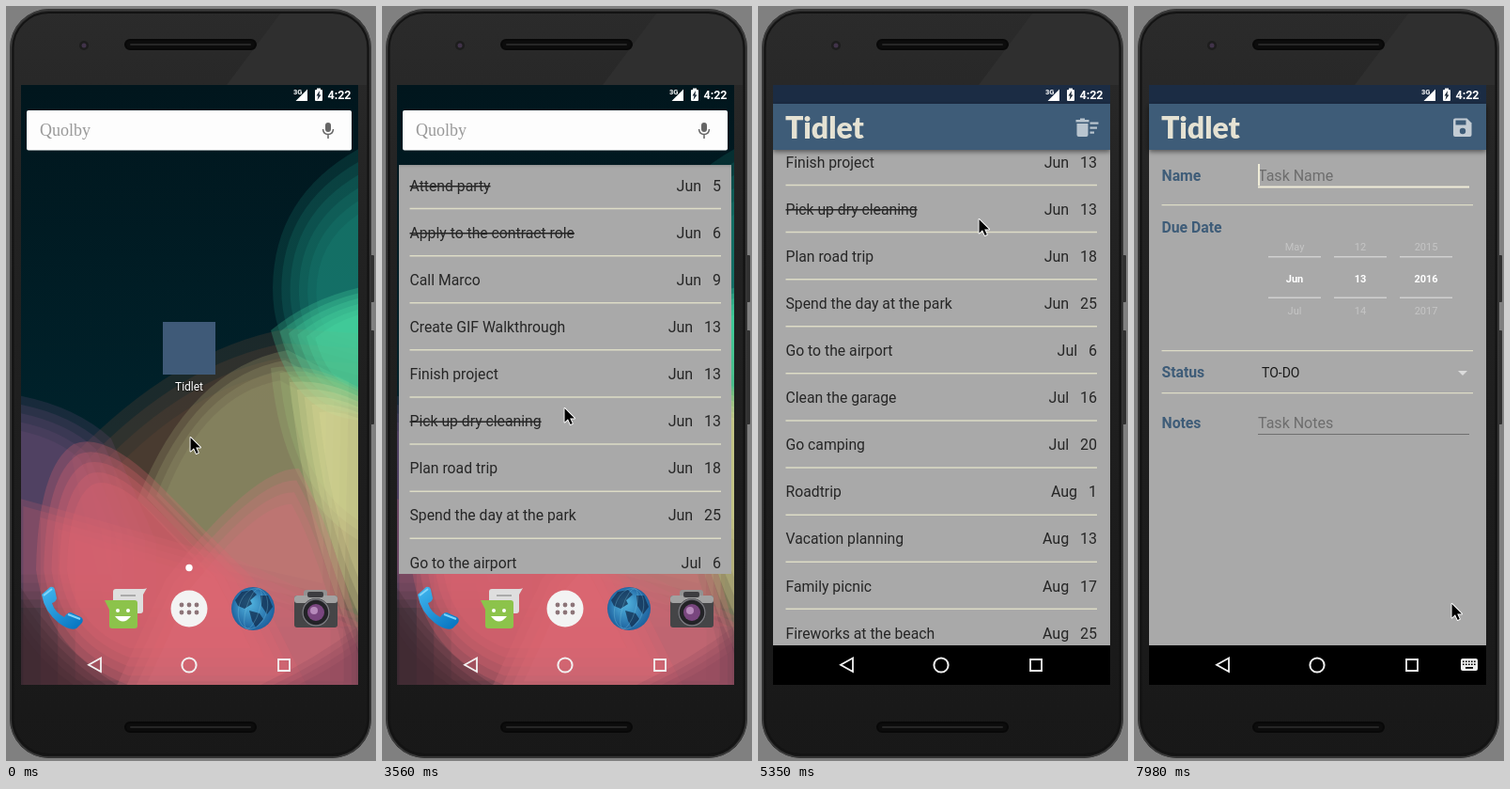
These frames come from a looping animation (394x803 px, 8000 ms). An HTML page with a canvas:

```html
<!DOCTYPE html>
<html lang="en">
<head>
<meta charset="utf-8">
<title>To-do app walkthrough</title>
<style>
  html, body { margin: 0; width: 100%; height: 100%; overflow: hidden; background: #808080; }
  canvas { display: block; }
</style>
</head>
<body>
<canvas id="stage" width="394" height="803"></canvas>
<script>
const ctx = document.getElementById('stage').getContext('2d');
const LOOP = 8000, ROW = 50.1, CREAM = '#dddcc6', BLUE = '#3e5c78', INK = '#262626';
const APP = 'Tidlet';

const TASKS = `-Attend party|Jun   5
-Apply to the contract role|Jun   6
Call Marco|Jun   9
Create GIF Walkthrough|Jun   13
Finish project|Jun   13
-Pick up dry cleaning|Jun   13
Plan road trip|Jun   18
Spend the day at the park|Jun   25
Go to the airport|Jul   6
Clean the garage|Jul   16
Go camping|Jul   20
Roadtrip|Aug   1
Vacation planning|Aug   13
Family picnic|Aug   17
Fireworks at the beach|Aug   25`.split('\n').map(line => {
  const [name, date] = line.replace('-', '').split('|');
  return { name, date, done: line[0] === '-' };
});

const TICKS = [0, 500, 660, 820, 980, 1140, 1300, 1450, 1590, 2270, 2550, 2830,
  3140, 3280, 3420, 3560, 3720, 3860, 4000, 4130, 4250, 4710, 4830, 4960, 5090, 5220,
  5350, 5500, 5630, 5910, 6050, 6190, 6320, 6450, 6580, 6710, 6850,
  7000, 7150, 7300, 7450, 7850, 7980];

// Tracks are flat lists of time, value pairs.
const cursorX = [400, 196, 1450, 188, 3000, 188, 3560, 194, 4130, 219, 4600, 220, 4830, 226,
  5350, 235, 5630, 237, 5800, 238, 6320, 244, 6850, 258, 7450, 338];
const cursorY = [400, 458, 1450, 370, 3000, 370, 3560, 427, 4130, 476, 4600, 476, 4830, 404,
  5350, 226, 5630, 180, 5800, 182, 6320, 354, 6850, 497, 7450, 635];
const scrollY = [4680, 0, 4830, 25.5, 5350, 213, 5500, 225, 5790, 225, 6320, 66, 6580, 0];
const fabSize = [4740, 1, 4830, .85, 4950, 0, 5900, 0, 6150, 1];
const clipTop = [3300, 336, 3560, 169, 3720, 98, 3860, 84];
const clipBottom = [3300, 392, 3560, 604, 3720, 700, 3860, 722];
const clipHalf = [3300, 28, 3420, 140, 3560, 177, 3720, 180];
const slide = [3300, 30, 3560, 12.5, 3860, 0];

function track(t, keys) {
  if (t <= keys[0]) return keys[1];
  for (let i = 2; i < keys.length; i += 2)
    if (t < keys[i]) {
      const k = (t - keys[i - 2]) / (keys[i] - keys[i - 2]);
      return keys[i - 1] + k * (keys[i + 1] - keys[i - 1]);
    }
  return keys[keys.length - 1];
}

function rect(x, y, w, h, color, r = 0) {
  ctx.fillStyle = color;
  ctx.beginPath();
  ctx.roundRect(x, y, w, h, r);
  ctx.fill();
}
function frame(x, y, w, h, color, r = 0, width = 1) {
  ctx.strokeStyle = color;
  ctx.lineWidth = width;
  ctx.beginPath();
  ctx.roundRect(x, y, w, h, r);
  ctx.stroke();
}
function disc(x, y, r, color) {
  ctx.fillStyle = color;
  ctx.beginPath();
  ctx.arc(x, y, r, 0, 7);
  ctx.fill();
}
function ring(x, y, r, color, width) {
  ctx.strokeStyle = color;
  ctx.lineWidth = width;
  ctx.beginPath();
  ctx.arc(x, y, r, 0, 7);
  ctx.stroke();
}
function shape(d, color, x = 0, y = 0, stroke = 0) {
  ctx.save();
  ctx.translate(x, y);
  const path = new Path2D(d);
  if (stroke) {
    ctx.lineWidth = stroke;
    ctx.strokeStyle = color;
    ctx.stroke(path);
  } else {
    ctx.fillStyle = color;
    ctx.fill(path);
  }
  ctx.restore();
}
function text(s, x, y, font, color, align = 'left') {
  ctx.font = font;
  ctx.fillStyle = color;
  ctx.textAlign = align;
  ctx.fillText(s, x, y);
}
const roboto = (size, weight = 400) => `${weight} ${size}px Roboto, sans-serif`;
function clipped(x, y, w, h, draw) {
  ctx.save();
  ctx.beginPath();
  ctx.rect(x, y, w, h);
  ctx.clip();
  draw();
  ctx.restore();
}

// Translucent copies shrinking towards a focus give the banded glow of the wallpaper.
function glow(d, x, y, rgb, bands, alpha) {
  const path = new Path2D(d);
  ctx.fillStyle = `rgba(${rgb},${alpha})`;
  for (let i = 0; i < bands; i++) {
    ctx.save();
    ctx.translate(x, y);
    ctx.scale(1 - i * .08, 1 - i * .08);
    ctx.translate(-x, -y);
    ctx.fill(path);
    ctx.restore();
  }
}

function body() {
  rect(0, 0, 394, 803, '#808080');
  rect(388, 265, 4, 50, '#303030', 1);
  rect(388, 345, 4, 100, '#303030', 1);
  const g = ctx.createLinearGradient(0, 0, 0, 803);
  g.addColorStop(0, '#2b2b2b');
  g.addColorStop(.3, '#222');
  g.addColorStop(1, '#181818');
  rect(4, 3, 385, 797, g, 42);
  shape('M292 8 H345 Q384 10 384 46 V84 H235 Z', '#2f2f2f');
  frame(5, 4, 383, 795, '#3c3c3c', 41, 1.5);
  frame(7.5, 7, 378, 789, '#131313', 38, 2);
  for (const y of [36, 762]) {
    rect(127, y, 139, 10, '#0c0c0c', 5);
    frame(127, y, 139, 10, '#080808', 5, 2);
    rect(132, y + 4, 129, 2, '#262626', 1);
  }
  disc(83, 42, 5, '#1d1d1d');
  disc(83, 42, 2.5, '#41334a');
}

function wallpaper() {
  const g = ctx.createLinearGradient(0, 84, 0, 450);
  g.addColorStop(0, '#01161d');
  g.addColorStop(1, '#00222b');
  rect(16, 84, 359, 638, g);
  glow('M400 140 Q285 190 284 300 Q284 350 310 375 L400 400 Z', 400, 310, '28,146,126', 6, .19);
  glow('M70 480 Q180 365 300 343 L400 350 V660 H110 Z', 255, 540, '104,70,52', 4, .26);
  glow('M140 525 Q195 385 300 366 L365 400 L360 650 L230 620 Z', 265, 500, '150,150,108', 4, .3);
  glow('M282 345 Q330 305 400 295 V440 Q310 450 282 345 Z', 400, 365, '76,222,162', 6, .24);
  glow('M282 385 Q330 375 400 420 V580 Q295 540 282 385 Z', 400, 450, '160,200,124', 3, .2);
  glow('M302 400 Q350 395 400 430 V730 Q325 610 302 400 Z', 400, 500, '228,224,156', 5, .22);
  glow('M0 412 Q70 422 112 460 L160 570 V640 H0 Z', 10, 530, '122,80,126', 5, .2);
  glow('M0 520 Q110 550 250 590 L400 660 V740 H0 Z', 230, 670, '196,90,106', 5, .22);
  glow('M170 610 Q265 490 312 492 Q350 560 385 700 V740 H110 Z', 280, 650, '212,112,124', 4, .26);
  glow('M32 600 Q34 490 72 466 Q105 452 162 508 L264 610 L320 722 H130 Q45 690 32 600 Z', 135, 600, '222,100,112', 5, .27);
  glow('M0 590 Q50 690 150 740 H0 Z', 0, 740, '62,40,46', 5, .26);
  glow('M230 740 Q330 700 400 640 V740 Z', 400, 740, '120,62,84', 4, .18);
}

function dock() {
  disc(195, 597.5, 3.7, '#fff');

  const blue = ctx.createLinearGradient(40, 618, 75, 662);
  blue.addColorStop(0, '#42b7ef');
  blue.addColorStop(1, '#0876c2');
  shape('M38 626 L47 618 Q51 617 52 621 L54 630 Q53 634 49 635 Q52 645 62 650 Q65 645 69 645 L80 650 Q83 652 81 656 L75 662 Q68 665 56 656 Q41 644 38 626 Z', blue);
  shape('M40 627 L49 620 M66 647 L79 652', '#7fd4fa', 0, 0, 2);

  shape('M117 620 H146 Q149 620 150 619 L146 626 V643 Q146 646 143 646 H117 Q114 646 114 643 V623 Q114 620 117 620 Z', '#dedede');
  shape('M122 627 H138', '#aaa', 0, 0, 2);
  shape('M105 632 H137 Q140 632 140 635 V659 Q140 662 137 662 H113 Q110 662 110 659 V642 Z', '#8cc34b');
  disc(119, 643, 2, '#fff');
  disc(130, 643, 2, '#fff');
  shape('M116 649 Q124.500 660 133 649 Z', '#fff');

  disc(195, 641, 19.5, '#f3f3f3');
  for (let i = 0; i < 6; i++)
    disc(187 + i % 3 * 8, 637 + (i > 2) * 8, 2.4, '#8c7478');

  const sea = ctx.createRadialGradient(258, 634, 3, 263, 641, 24);
  sea.addColorStop(0, '#4fb0dc');
  sea.addColorStop(1, '#1c5f9c');
  disc(263, 641, 23, sea);
  shape('M244 632 L251 623 L262 621 L267 626 L260 632 L262 636 L254 641 L247 638 Z M259 643 L270 646 L274 652 L266 661 L262 654 Z M271 627 L279 627 L284 639 L278 647 L272 638 Z', 'rgba(18,45,78,.75)');
  for (const r of [7, 15]) {
    ctx.strokeStyle = 'rgba(130,205,230,.3)';
    ctx.lineWidth = 1;
    ctx.beginPath();
    ctx.ellipse(263, 641, r, 22, .3, 0, 7);
    ctx.stroke();
  }

  rect(317, 621, 25, 12, '#929292', 3);
  rect(307, 627, 46, 34, '#454547', 3);
  rect(307, 627, 46, 8, '#a2a2a2', 3);
  rect(321, 623, 17, 6, '#3d3d40', 2);
  disc(330, 645, 15, '#232327');
  ring(330, 645, 14, '#77777c', 1.5);
  disc(330, 645, 9, '#79467f');
  disc(328, 643, 4, '#b68abb');
}

function home(t) {
  clipped(16, 84, 359, 638, wallpaper);
  rect(22, 111, 346, 42.5, '#fdfdfd', 2);
  text('Quolby', 36, 138, '18px "Liberation Serif", serif', '#999');
  rect(340, 124, 6, 10, '#666', 3);
  shape('M337.500 131 Q338 136.500 343 136.500 T348.500 131 M343 137 V141', '#666', 0, 0, 1.5);

  rect(167, 336, 56, 56, '#3f5a78');
  const press = track(t, [1450, 0, 1590, .05, 2830, .15, 3140, .15, 3420, 0]);
  rect(167, 336, 56, 56, `rgba(255,255,255,${press})`);
  ctx.save();
  ctx.shadowColor = '#000';
  ctx.shadowBlur = 3;
  text(APP, 195, 409, roboto(12), '#fff', 'center');
  ctx.restore();
  dock();
}

function appBar() {
  rect(16, 84, 359, 20, '#1b2c44');
  ctx.save();
  ctx.shadowColor = 'rgba(0,0,0,.5)';
  ctx.shadowBlur = 5;
  ctx.shadowOffsetY = 2;
  rect(16, 104, 359, 49, BLUE);
  ctx.restore();
  text(APP, 29, 141, '900 32px Lato, sans-serif', '#e5e2d3');
  rect(16, 680, 359, 42, '#000');
}

function ripple(t, scroll) {
  if (t < 4700 || t > 4950) return;
  const top = 153 + 6 * ROW - scroll;
  clipped(16, top, 359, ROW, () =>
    disc(214, 478.5 - scroll, track(t, [4700, 25, 4830, 35]), 'rgba(0,0,0,.06)'));
}

function fab(t) {
  const size = track(t, fabSize);
  if (!size) return;
  ctx.save();
  ctx.globalAlpha = size;
  ctx.translate(336, 641);
  ctx.scale(size, size);
  ctx.shadowColor = 'rgba(0,0,0,.45)';
  ctx.shadowBlur = 6;
  ctx.shadowOffsetY = 3;
  disc(0, 0, 24.3, t >= 7850 ? '#5b758e' : BLUE);
  ctx.shadowColor = 'transparent';
  shape('M-5.500 0 H5.500 M0 -5.500 V5.500', '#e9e6d8', 0, 0, 2.2);
  ctx.restore();
}

function listScreen(t) {
  const scroll = track(t, scrollY);
  rect(16, 84, 359, 638, '#a9a9a9');
  ripple(t, scroll);
  TASKS.forEach(({ name, date, done }, i) => {
    const y = 178.5 + i * ROW - scroll;
    if (y < 100 || y > 710) return;
    text(date, 361, y + 5.7, roboto(16), INK, 'right');
    text(name, 29.5, y + 5.7, roboto(15.75), INK);
    if (done) rect(29.5, y, ctx.measureText(name).width, 1.5, INK);
    rect(29.5, y + 23.8, 331.5, 1.5, CREAM);
  });
  fab(t);
  appBar();
  const icon = '#b9c5cf';
  rect(338.5, 121, 14, 2.5, icon);
  rect(343, 119.5, 5, 2, icon);
  rect(339.5, 125, 12, 14, icon, [0, 0, 2, 2]);
  [9, 7.5, 4.5].forEach((w, i) => rect(353.5, 123.5 + i * 5, w, 2.2, icon));
}

function formScreen() {
  rect(16, 84, 359, 638, '#a9a9a9');
  appBar();
  shape('M342 119.500 H354.500 L359.500 124.500 V137 Q359.500 139 357.500 139 H342 Q340 139 340 137 V121.500 Q340 119.500 342 119.500 Z', '#c3ccd4');
  rect(342.5, 121.5, 11, 5, BLUE);
  disc(350, 133, 3.2, BLUE);

  [['Name', 186], ['Due Date', 240.5], ['Status', 395], ['Notes', 449]]
    .forEach(([label, y]) => text(label, 29.5, y, roboto(15.75, 700), BLUE));
  for (const y of [211, 366, 411]) rect(29.5, y, 331.5, 1.3, CREAM);

  text('Task Name', 132, 186, roboto(16), '#6d6d6d');
  rect(132, 168, 2, 23, '#efecd8');
  rect(132, 191.5, 225, 2, '#efecd8');
  text('Task Notes', 132, 449, roboto(16), '#6d6d6d');
  rect(132, 455, 225, 1, '#6f6f6f');

  ['May Jun Jul', '12 13 14', '2015 2016 2017'].forEach((values, col) => {
    const x = 171 + col * 70;
    values.split(' ').forEach((value, row) =>
      text(value, x, 259.5 + row * 34, roboto(11, row === 1 ? 700 : 400),
        row === 1 ? '#fff' : '#c5c5c5', 'center'));
    for (const y of [266, 309.5]) rect(x - 28, y, 56, 1.5, '#d0d0d0');
  });

  text('TO-DO', 136, 395, roboto(14), '#1a1a1a');
  shape('M345 388 H355 L350 393 Z', '#dcdcdc');

  rect(348, 694, 18, 13, '#eee', 2);
  for (let i = 0; i < 10; i++)
    rect(350 + i % 5 * 3, 696.5 + (i > 4) * 3, 1.6, 1.6, '#000');
  rect(353, 703, 8, 1.8, '#000');
}

function statusBar() {
  text('3G', 306, 94, roboto(7.5, 700), '#fff');
  shape('M321 88.500 V101 H308.500 Z', '#fff');
  rect(331, 87.5, 4, 2, '#fff');
  rect(329, 89, 8, 12, '#fff', 1);
  shape('M334 90 L330.500 95.500 H332.500 L331.500 100 L335.500 94.500 H333.500 Z', '#182432');
  text('4:22', 367.5, 99, roboto(12.5, 700), '#fff', 'right');
}

function navIcons() {
  shape('M101 693.500 V708 L88 700.750 Z', '#f2f2f2', 0, 0, 1.8);
  ring(195, 701, 7.6, '#f2f2f2', 2);
  frame(290, 695, 12, 12, '#f2f2f2', 0, 1.8);
}

function pointer(x, y) {
  const d = 'M0.500 1 V15.500 L4 12.300 L6.700 18 L8.800 17.100 L6.200 11.500 H11 Z';
  ctx.lineJoin = 'round';
  shape(d, '#fff', x, y, 1.8);
  shape(d, '#000', x, y);
  ctx.lineJoin = 'miter';
}

function render(time) {
  const t = TICKS.findLast(tick => tick <= time);
  body();
  if (t < 3860) home(t);
  if (t >= 7980) formScreen();
  else if (t > 3300) {
    const top = track(t, clipTop), half = track(t, clipHalf);
    clipped(Math.max(16, 195 - half), top, Math.min(359, half * 2), track(t, clipBottom) - top, () => {
      ctx.translate(0, track(t, slide));
      listScreen(t);
    });
  }
  statusBar();
  navIcons();
  pointer(track(t, cursorX), track(t, cursorY));
}

function loop() {
  render(performance.now() % LOOP);
  requestAnimationFrame(loop);
}
loop();
</script>
</body>
</html>
```
